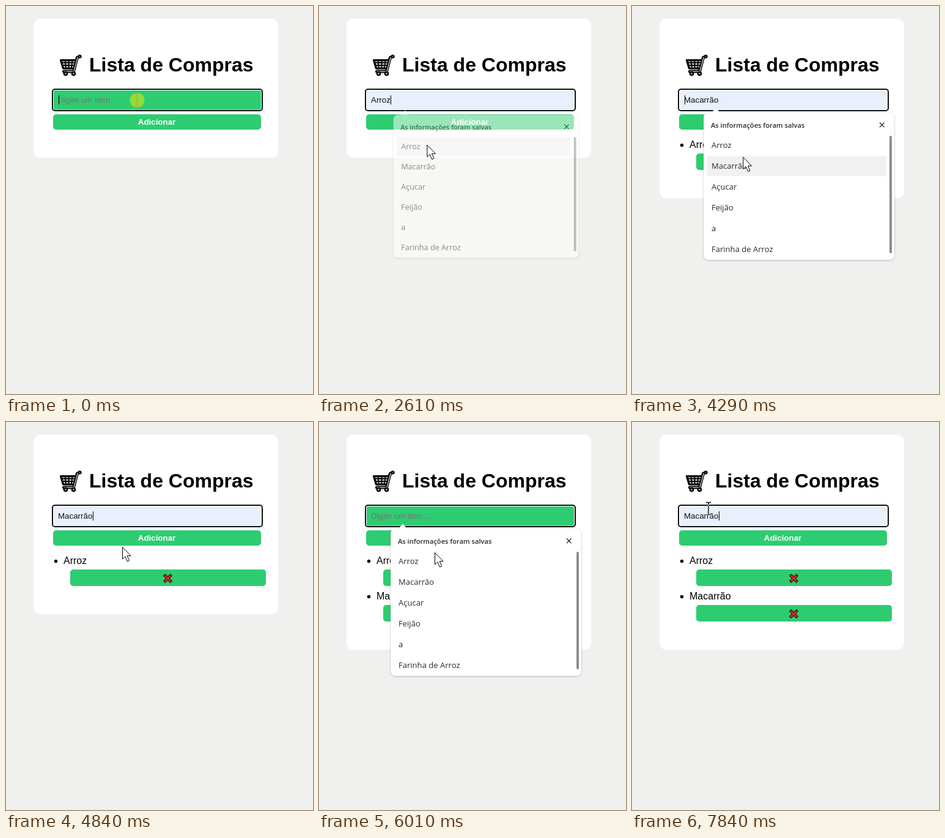
Recreate the animation shown at these times as an HTML page. Size 502 px wide and 634 px high, loop 8 s.

```html
<!DOCTYPE html>
<html lang="pt-BR">
<head>
<meta charset="utf-8">
<title>Lista de Compras</title>
<style>
html, body { margin: 0; width: 100%; height: 100%; overflow: hidden; background: #f0f0ee; }
svg { display: block; width: 502px; height: 634px; font-family: "Liberation Sans", Arial, sans-serif; }
.btn { fill: #2ecc71; }
.btn.hover { fill: #27ae60; }
.popup-text { font-family: "Open Sans", "Noto Sans", sans-serif; fill: #2b2b2b; }
#ibeam { mix-blend-mode: difference; }
</style>
</head>
<body>
<svg viewBox="0 0 502 634">
  <defs>
    <g id="cross" fill="none" stroke-linecap="square">
      <path d="M-4.2-4.2 4.2 4.2M4.2-4.2-4.2 4.2" stroke="#3a120c" stroke-width="5"/>
      <path d="M-4.2-4.2 4.2 4.2M4.2-4.2-4.2 4.2" stroke="#c8321f" stroke-width="2.6"/>
    </g>
    <filter id="shadow" x="-5%" y="-5%" width="110%" height="112%">
      <feDropShadow dx="0" dy="1" stdDeviation="1.5" flood-opacity=".2"/>
    </filter>
  </defs>
  <rect width="502" height="634" fill="#f0f0ee"/>
  <rect id="card" x="45" y="21" width="400" height="227" rx="10" fill="#fff"/>

  <g fill="none" stroke-linecap="round" stroke-linejoin="round">
    <path d="M121 82.500 116.500 84 110.500 107H94.500" stroke="#000" stroke-width="5"/>
    <path d="M89.500 88.500H115L111 102H93.500Z" fill="#c4c8c8" stroke="#000" stroke-width="3.200"/>
    <path d="M91 92.500h22M92.500 97h19M96.500 89l1.500 12M102.500 89v12M108.500 89l-1.500 12" stroke="#000" stroke-width="1.800"/>
    <path d="M119.500 83 117 84.500 111 107H95" stroke="#b9bdbd" stroke-width="1.500"/>
    <circle cx="120.500" cy="82.500" r="2" fill="#b98350" stroke="#000" stroke-width="2"/>
    <circle cx="97.500" cy="110.500" r="2.600" fill="#aaa" stroke="#000" stroke-width="2.400"/>
    <circle cx="110.500" cy="110.500" r="2.600" fill="#aaa" stroke="#000" stroke-width="2.400"/>
  </g>
  <text x="136" y="107" font-size="32" font-weight="700">Lista de Compras</text>

  <rect id="outline" x="76" y="136" width="343" height="35" rx="4" fill="#fff" stroke="#101010" stroke-width="2"/>
  <rect id="field" x="78" y="138" width="339" height="31.500" rx="2"/>
  <text id="value" x="85" y="158" font-size="13.333"></text>
  <rect id="caret" y="146" width="1" height="15"/>

  <rect id="add" class="btn" x="77" y="177" width="340" height="25" rx="5"/>
  <text x="246.500" y="194" font-size="13.333" font-weight="700" fill="#fff" text-anchor="middle">Adicionar</text>
  <g id="list"></g>

  <g id="popup">
    <path filter="url(#shadow)" fill="#fff" stroke="#000" stroke-opacity=".06" d="M125 174h5l7-7.500 7 7.500h277a8 8 0 0 1 8 8v225a8 8 0 0 1-8 8H125a8 8 0 0 1-8-8V182a8 8 0 0 1 8-8Z"/>
    <rect id="row" x="122" width="294" height="33" rx="4" fill="#f1f1f1"/>
    <text class="popup-text" x="129" y="199" font-size="11.100" font-weight="600">As informações foram salvas</text>
    <path d="M405 190.500l7.500 7.500M412.500 190.500 405 198" stroke="#222" stroke-width="1.200"/>
    <rect x="421" y="212" width="4" height="192" rx="2" fill="#8d8d8d"/>
    <g id="options" class="popup-text" font-size="13.050"></g>
  </g>

  <path id="ibeam" d="M-4-10h3l1 1 1-1h3M0-9V9M-4 10h3l1-1 1 1h3" fill="none" stroke="#fff" stroke-width="1.500"/>
  <path id="arrow" d="M.500.500V20l4.300-4.200 3.600 8.200 3.300-1.500-3.500-7.800h6Z" fill="#fff" stroke="#000"/>
  <path id="hand" d="M-2 11V1.500a1.800 1.800 0 0 1 3.600 0V8q3-1 3.600 1 3-.8 3.500 1 3-.5 3 2v5q0 3-2.500 6H0q-1-3-6-8.500-1.500-2.500 1-3 1.500 0 3 2Z" fill="#fff" stroke="#000"/>
  <circle id="click" r="12" fill="#f0f000" opacity=".5"/>
</svg>
<script>
const LOOP = 8000;
const options = ["Arroz", "Macarrão", "Açucar", "Feijão", "a", "Farinha de Arroz"];

// Pointer path: time, x, y
const path = [
  [0, 214.5, 154], [1610, 214.5, 154], [1880, 182, 192], [2010, 182, 192],
  [2210, 176, 228], [2600, 176, 228], [2900, 186, 190], [3370, 186, 190],
  [3435, 187, 169.5], [3500, 187, 169.5], [3700, 190, 156], [4030, 190, 156],
  [4330, 180, 260], [4680, 180, 260], [4830, 190, 204], [4910, 190, 204],
  [5060, 192, 190], [5270, 192, 190], [5490, 196, 151], [5680, 196, 151],
  [5780, 196, 147], [5920, 196, 147], [6000, 189, 213], [6080, 189, 213],
  [6330, 180, 260], [6880, 180, 260], [7150, 192, 256], [7400, 184, 252],
  [7495, 150, 212], [7560, 150, 212], [7570, 125, 141.5], [LOOP, 125, 141.5]
];
const popups = [[80, 2440], [3870, 4490], [5900, 6670]];
const clicks = [0, 2420, 3080, 3800, 4470, 5130, 5830, 6670];
// Field contents and caret restart: time, text, caret x
const edits = [
  [60, "", 86], [2440, "Arroz", 117], [3100, "", 86],
  [4490, "Macarrão", 142], [5200, "", 86], [6780, "Macarrão", 142]
];
edits[5][0] = 6670;
const added = [3100, 5200];
const heights = [227, 293, 351];

const $ = id => document.getElementById(id);
const show = (el, on) => el.style.display = on ? "" : "none";
const within = (t, from, length) => t >= from && t < from + length;

$("options").innerHTML = options.map((s, i) => `<text x="130" y="${232 + 34 * i}">${s}</text>`).join("");
$("list").innerHTML = options.slice(0, 2).map((s, i) => `<g transform="translate(0 ${58 * i})">
  <circle cx="81.500" cy="227.500" r="2.700"/><text x="94" y="232" font-size="16">${s}</text>
  <rect class="btn" x="105" y="241" width="320" height="27" rx="5"/>
  <use href="#cross" x="264.500" y="255.500"/></g>`).join("");
const rows = [...$("list").children];

function pointer(t) {
  const i = path.findIndex(p => p[0] > t);
  const [t0, x0, y0] = path[i - 1], [t1, x1, y1] = path[i];
  const k = (t - t0) / (t1 - t0);
  return [x0 + (x1 - x0) * k, y0 + (y1 - y0) * k];
}

function popupAlpha(t) {
  const p = popups.findLast(p => t >= p[0]);
  return p ? Math.max(0, Math.min(1, 1 - (t - p[1] - 65) / 220)) : 0;
}

function draw(t) {
  const [x, y] = pointer(t);
  const alpha = popupAlpha(t);
  const open = alpha > 0;
  const hover = open && y > 214 ? Math.floor((y - 210.5) / 34) : -1;

  const [start, text, caretX] = edits.findLast(e => t >= e[0]) || edits[0];
  const shown = text || options[hover] || "";
  const focused = !within(t, 3080, 20) && !within(t, 5130, 70);
  $("value").textContent = shown || "Digite um item...";
  $("value").setAttribute("fill", shown ? "#111" : "#757575");
  $("field").setAttribute("fill", shown ? "#e8f0fe" : "#2ecc71");
  $("outline").setAttribute("stroke", focused ? "#101010" : "#fff");
  $("caret").setAttribute("x", caretX);
  show($("caret"), focused && Math.floor((t - start) / 530) % 2 <= 0);

  const count = added.filter(a => t >= a).length;
  $("card").setAttribute("height", heights[count]);
  const overAdd = !open && y >= 177 && y < 202;
  let overButton = overAdd;
  $("add").classList.toggle("hover", overAdd);
  rows.forEach((row, i) => {
    const top = 241 + 58 * i;
    const over = !open && i < count && x >= 105 && y >= top && y < top + 27;
    overButton ||= over;
    show(row, i < count);
    row.querySelector("rect").classList.toggle("hover", over);
  });

  const scale = 1 - 0.06 * (1 - alpha);
  show($("popup"), open);
  $("popup").setAttribute("opacity", alpha);
  $("popup").setAttribute("transform", `translate(273 294) scale(${scale}) translate(-273 -294)`);
  show($("row"), hover >= 0);
  $("row").setAttribute("y", 211 + 34 * hover);

  const inField = y >= 136 && y < 172;
  const kind = inField ? "ibeam" : overButton ? "hand" : "arrow";
  for (const id of ["ibeam", "arrow", "hand", "click"]) {
    $(id).setAttribute("transform", `translate(${x} ${y})`);
    show($(id), id === kind);
  }
  show($("click"), clicks.some(c => within(t, c, c ? 70 : 80)));
}

const begin = performance.now();
function tick() {
  draw((performance.now() - begin) % LOOP);
  requestAnimationFrame(tick);
}
tick();
</script>
</body>
</html>
```
